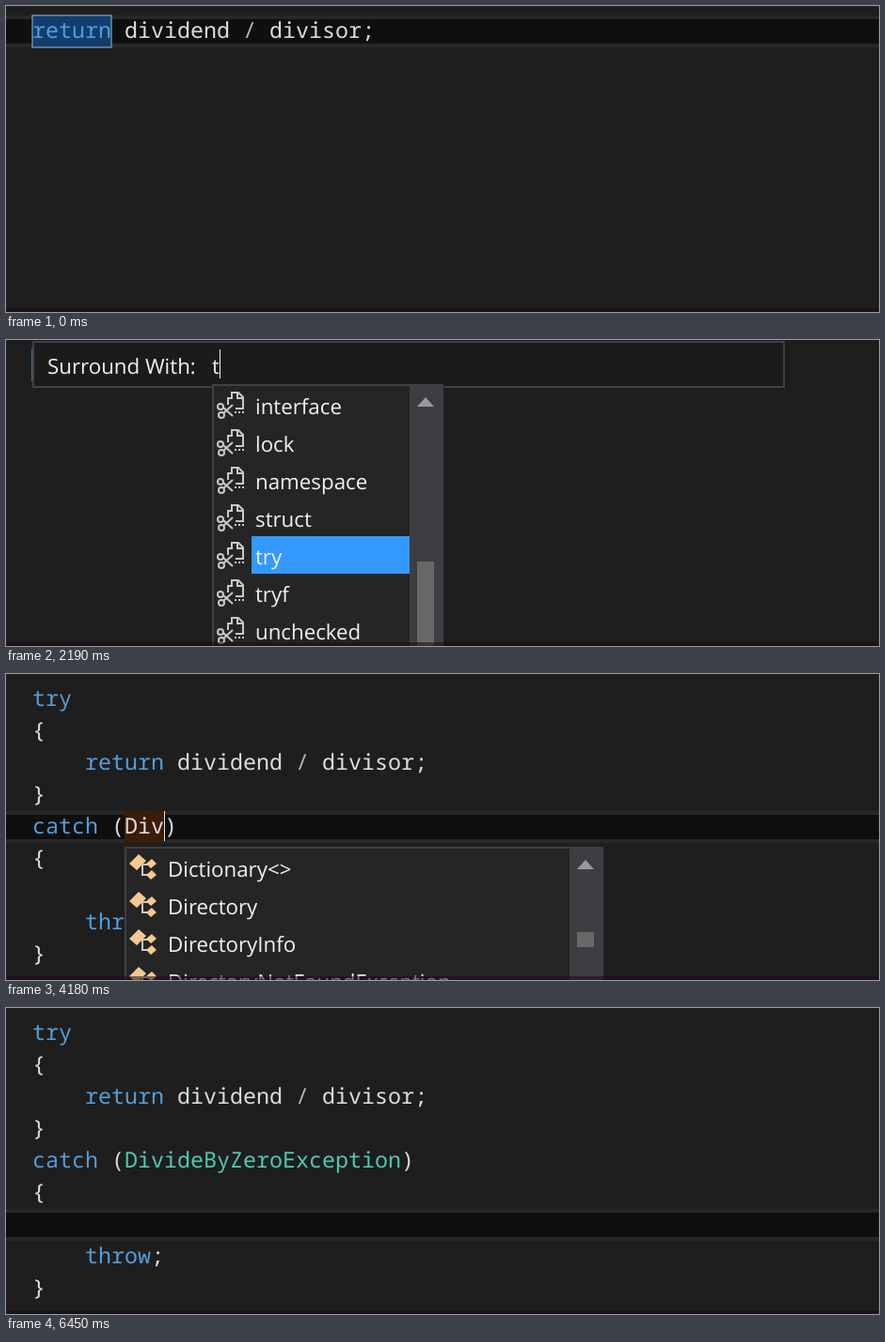
Write an HTML page that moves like this. It is 928 px wide and 326 px high and loops after 6.96 s.

```html
<!DOCTYPE html>
<html lang="en">
<head>
<meta charset="utf-8">
<title>Surround with try</title>
<style>
  html, body { margin: 0; width: 928px; height: 326px; overflow: hidden; background: #1e1e1e; }
  svg { display: block; }
  text { white-space: pre; text-rendering: geometricPrecision; }
  .code { font: 23.333px "Noto Sans Mono", monospace; }
  .ui { font: 22.3px "Open Sans", "Noto Sans", sans-serif; fill: #f1f1f1; }
</style>
</head>
<body>
<svg id="stage" width="928" height="326" viewBox="0 0 928 326">
  <defs>
    <g id="snippet" fill="none" stroke="#c8c8c8" stroke-width="2">
      <path d="M12 14V7H16V1H23L28 6V18H20M22 1V7H28"/>
      <circle cx="4" cy="16" r="3"/>
      <circle cx="5" cy="25" r="3"/>
      <path d="M7 17L17 26M7 23L17 14"/>
      <path d="M19 22H29" stroke-dasharray="2 2"/>
    </g>
    <g id="class">
      <path d="M5 11H14V22H19M14 11H20" fill="none" stroke="#c8c8c8" stroke-width="2"/>
      <path d="M0 10L10 0L18 7L8 17ZM18 10L24 5L29 10L23 15ZM18 22L24 17L29 22L23 27Z" fill="#f5c98f"/>
    </g>
  </defs>
  <g id="view"></g>
  <rect y="322" width="928" height="4" fill="#1e0816" opacity=".55"/>
</svg>
<script>
const LOOP = 6960, LEFT = 28, CELL = 14, LINE = 34, ROW = 40;
const BLUE = '#569cd6', PLAIN = '#dcdcdc', DIM = '#b4b4b4', TEAL = '#4ec9b0';
const EDGE = '#3f3f46', PANEL = '#252526', PICK = '#3399ff';

const SNIPPETS = ['#if', '#region', 'checked', 'class', 'do', 'else', 'enum', 'for', 'foreach',
  'forr', 'if', 'interface', 'lock', 'namespace', 'struct', 'try', 'tryf', 'unchecked',
  'unsafe', 'using', 'while'];
const TYPES = ['Dictionary<>', 'Directory', 'DirectoryInfo', 'DirectoryNotFoundException'];
const MATCH = 'DivideByZeroException';

const view = document.getElementById('view');
const esc = s => s.replace(/&/g, '&amp;').replace(/</g, '&lt;').replace(/>/g, '&gt;');
const rect = (x, y, w, h, fill, extra = '') =>
  `<rect x="${x}" y="${y}" width="${w}" height="${h}" fill="${fill}" ${extra}/>`;
const label = (x, y, s) => `<text class="ui" x="${x}" y="${y}">${esc(s)}</text>`;
const code = (row, col, s, fill = PLAIN) =>
  `<text class="code" x="${LEFT + col * CELL}" y="${34 + row * LINE}" fill="${fill}">${esc(s)}</text>`;
const caret = (row, x) => rect(x, 10 + row * LINE, 1, 32, PLAIN);
const panel = (x, y, w, h, fill) =>
  rect(x + 1, y + 1, w - 2, h - 2, fill, `stroke="${EDGE}" stroke-width="2"`);

// True while t lies inside any of the [start, end] pairs
const within = (t, ...spans) => spans.some(([a, b]) => t >= a && t < b);

function currentLine(row) {
  const y = 10 + row * LINE;
  return rect(0, y, 928, 34, '#282828') + rect(0, y + 4, 928, 26, '#0f0f0f');
}

function statement(row, col) {
  return code(row, col, 'return', BLUE) + code(row, col + 7, 'dividend') +
    code(row, col + 16, '/', DIM) + code(row, col + 18, 'divisor;');
}

function scrollBar(x, y, thumbY, thumbH) {
  return rect(x, y, 34, 400, '#3e3e42') +
    `<path d="M${x + 8} ${y + 22}L${x + 17} ${y + 12}L${x + 26} ${y + 22}Z" fill="#999"/>` +
    rect(x + 8, thumbY, 18, thumbH, '#686868');
}

function list(x, y, w, h, icon, items, picked, textX, rightPad) {
  let out = panel(x, y, w, h, PANEL);
  items.forEach((item, i) => {
    const top = y + 2 + i * ROW;
    if (i === picked) out += rect(textX - 4, top, x + w - rightPad - textX + 4, ROW, PICK);
    out += `<use href="#${icon}" x="${x + 5}" y="${top + 6}"/>` + label(textX, top + 30, item);
  });
  return out;
}

function surroundBox(t) {
  const typed = t < 2150 ? '' : t < 2350 ? 't' : t < 2500 ? 'tr' : 'try';
  const caretX = [220, 227, 235, 247][typed.length];
  let out = panel(28, 1, 800, 50, '#1b1b1c') + label(44, 36, 'Surround With:') + label(219, 36, typed);
  if (t < 2670) out += rect(caretX, 10, 1, 31, '#f1f1f1');
  if (t >= 1720) {
    const first = t < 2190 ? 0 : 11;
    out += list(219, 47, 246, 364, 'snippet', SNIPPETS.slice(first, first + 9), first ? 4 : 0, 265, 36);
    out += scrollBar(429, 49, first ? 236 : 84, 124);
  }
  return out;
}

function single(t) {
  const selected = t >= 820;
  let out = selected ? rect(28, 9, 364, 36, '#264f78') : currentLine(0);
  out += rect(28, 10, 84, 34, selected ? '#1f62a8' : '#113d6f',
    `stroke="${selected ? '#62a5e4' : '#86a4c2'}" stroke-width="1.2"`);
  out += statement(0, 0);
  if (within(t, [50, 590])) out += caret(0, 392);
  if (within(t, [820, 1120])) out += caret(0, 28);
  if (within(t, [1640, 2820])) out += surroundBox(t);
  return out;
}

function block(t) {
  const name = t < 4040 ? 'Exception' : t < 4180 ? 'D' : t < 4820 ? 'Div' : MATCH;
  const width = name.length * CELL, end = 126 + width;
  let out = '';
  if (t >= 4040) out += currentLine(t < 5090 ? 4 : 6);
  if (within(t, [2920, 4040])) out += rect(126, 145, width, 36, '#3b4f6c');
  if (within(t, [4040, 5170])) out += rect(126, 146, width, 34, '#3c1c04');

  out += code(0, 0, 'try', BLUE) + code(1, 0, '{') + statement(2, 4) + code(3, 0, '}') +
    code(4, 0, 'catch', BLUE) + code(4, 6, '(') + code(4, 7, name, t < 4910 ? PLAIN : TEAL) +
    code(4, 7 + name.length, ')') + code(5, 0, '{') +
    code(7, 4, 'throw', BLUE) + code(7, 9, ';') + code(8, 0, '}');

  if (within(t, [2920, 3330], [3560, 3850], [4040, 5090])) out += caret(4, end);
  if (within(t, [5090, 5400], [5940, 6450])) out += caret(6, 84);

  if (within(t, [4180, 4300]))
    out += list(126, 184, 509, 364, 'class', TYPES, -1, 172, 36) + scrollBar(599, 186, 275, 16);
  if (within(t, [4300, 4820]))
    out += list(126, 184, 509, 45, 'class', [MATCH], 0, 172, 2);
  return out;
}

let shown = '';
function draw(t) {
  const next = t < 2870 ? single(t) : block(t);
  if (next !== shown) view.innerHTML = shown = next;
}

const start = performance.now();
function tick() {
  draw((performance.now() - start) % LOOP);
  requestAnimationFrame(tick);
}
tick();
</script>
</body>
</html>
```
